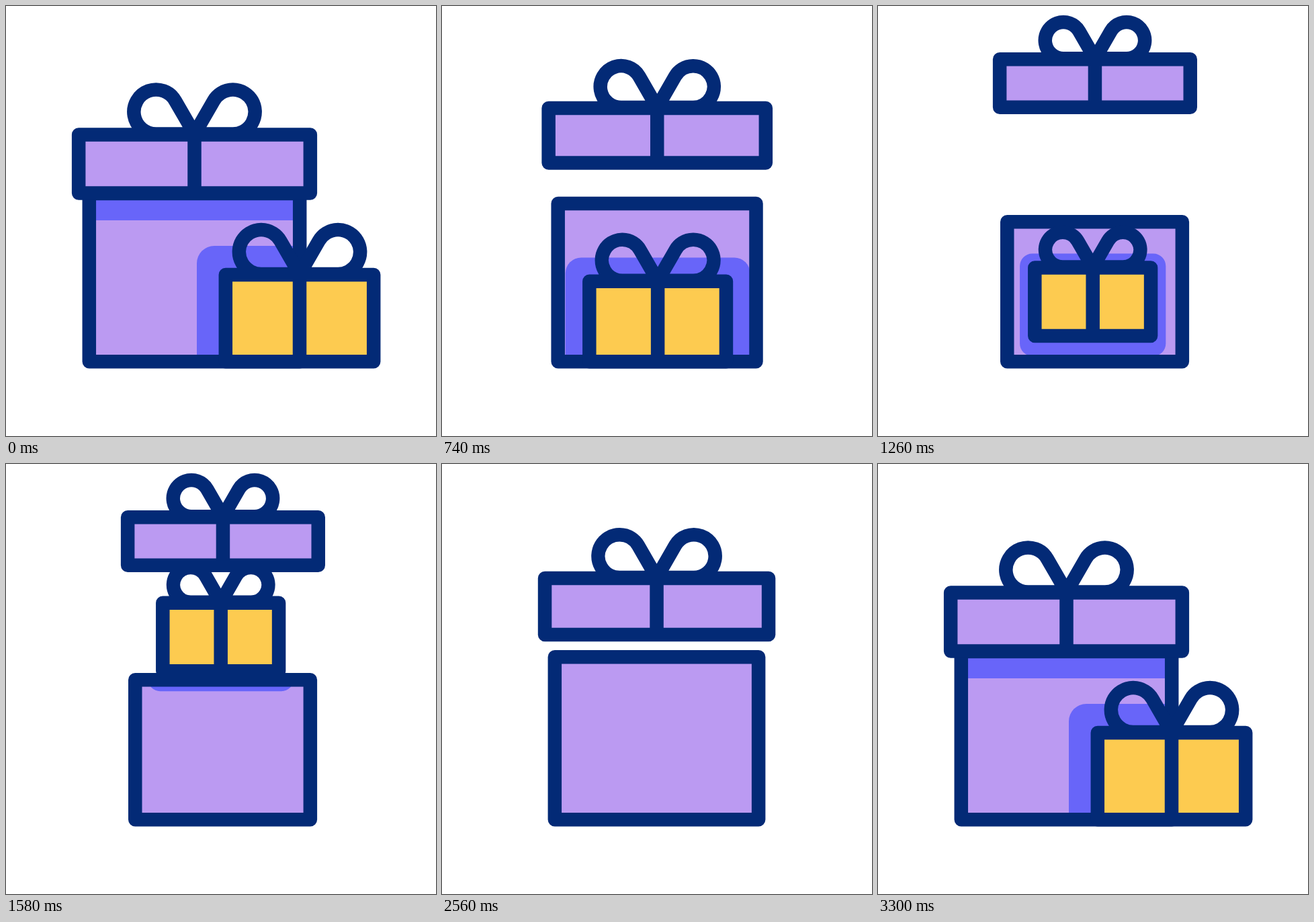
These frames come from a looping animation (640x640 px, 3.62 s). An HTML page:

```html
<!DOCTYPE html>
<html lang="en">
<head>
<meta charset="utf-8">
<title>Gift boxes</title>
<style>
  html, body { margin: 0; width: 100%; height: 100%; overflow: hidden; background: #fff; }
  svg { display: block; width: 100vw; height: 100vh; }
  .line { fill: none; stroke: #032a76; stroke-width: 20.5; stroke-linejoin: round; stroke-linecap: round; }
  .lilac { fill: #bb9af2; }
  .shade { fill: #6865f9; }
  .gold { fill: #fdcb50; }
</style>
</head>
<body>
<svg id="stage" viewBox="0 0 640 640">
  <clipPath id="inside"><path id="boxClip"/></clipPath>
  <g id="box">
    <path id="boxFill" class="lilac"/>
    <g clip-path="url(#inside)">
      <path id="lidShade" class="shade"/>
      <rect id="giftShade" class="shade"/>
    </g>
    <path id="boxLine" class="line"/>
  </g>
  <g id="gift">
    <path id="giftFill" class="gold"/>
    <path id="giftLine" class="line"/>
  </g>
  <g id="lid">
    <path id="lidFill" class="lilac"/>
    <path id="lidLine" class="line"/>
  </g>
</svg>
<script>
const LOOP = 3620, STEP = 20, FLOOR = 529.3;
const $ = id => document.getElementById(id);
const stage = $('stage'), gift = $('gift');

const mix = (a, b, p) => a + (b - a) * p;
const ease = (t, from, to) => {
  const x = Math.min(1, Math.max(0, (t - from) / (to - from)));
  return x * x * (3 - 2 * x);
};
const setPath = (id, d) => $(id).setAttribute('d', d);

// Rectangle standing on its bottom centre
const block = (cx, bottom, w, h) =>
  `M${cx - w / 2} ${bottom - h}h${w}v${h}h${-w}Z`;

// One loop: straight side from the knot, tangent to a circle, flat base
function loop(cx, y, r, side) {
  const c = cx - side * r * Math.sqrt(3);
  const tx = c + side * r * Math.sqrt(3) / 2;
  return `M${cx} ${y}L${tx} ${y - 1.5 * r}A${r} ${r} 0 1 ${side > 0 ? 0 : 1} ${c} ${y}Z`;
}

function drawParcel(name, cx, bottom, w, h, scale) {
  w *= scale;
  h *= scale;
  const top = bottom - h, knot = top - 0.9, r = 33 * scale;
  const body = block(cx, bottom, w, h);
  setPath(name + 'Fill', body);
  setPath(name + 'Line', body + `M${cx} ${top}V${bottom}` + loop(cx, knot, r, 1) + loop(cx, knot, r, -1));
}

function placeGift(behind) {
  const next = behind ? $('box') : $('lid');
  if (gift.nextElementSibling !== next) stage.insertBefore(gift, next);
}

function render(t) {
  const meet = ease(t, 0, 500);
  const open = ease(t, 500, 1100) - ease(t, 2200, 2700);
  const part = ease(t, 2800, 3200);

  const home = mix(mix(280.5, 318.75, meet), 280.5, part);
  const boxX = home + 3.8 * open;
  const lidX = home + 4.2 * open;
  const boxScale = mix(1, 0.8315, open);
  const body = block(boxX, FLOOR, 313.4 * boxScale, 250.2 * boxScale);
  for (const id of ['boxClip', 'boxFill', 'boxLine']) setPath(id, body);

  const lidY = mix(278.4, 150.8, open);
  drawParcel('lid', lidX, lidY, 344.7, 87, mix(1, 0.8228, open));
  setPath('lidShade', block(boxX, lidY + 40.6, 400, 200));

  const entering = t >= 2900;
  const behind = t >= 1800 && !entering;
  const shrink = entering ? 0 : ease(t, 500, 1100);
  const giftX = entering
    ? 437 + 340 * (1 - ease(t, 2900, 3300))
    : mix(437, 321.9, meet) - 2.2 * shrink;
  const rise = entering ? 0
    : Math.max(0, 288.8 * ease(t, 1100, 1800) - 292 * ease(t, 1800, 2700));
  drawParcel('gift', giftX, FLOOR - rise, 220.4, 129.4, mix(1, 0.784, shrink));
  placeGift(behind);

  const k = mix(1, 0.71, shrink);
  const shade = {
    x: giftX - 153 * k, y: FLOOR - rise - 172.4 * k,
    width: 306 * k, height: 172.4 * k + 30, rx: 26 * k
  };
  for (const key in shade) $('giftShade').setAttribute(key, shade[key]);
  $('giftShade').style.display = behind ? 'none' : '';
}

const start = performance.now();
function tick() {
  const t = (performance.now() - start) % LOOP;
  render(Math.floor(t / STEP) * STEP);
  requestAnimationFrame(tick);
}
tick();
</script>
</body>
</html>
```
